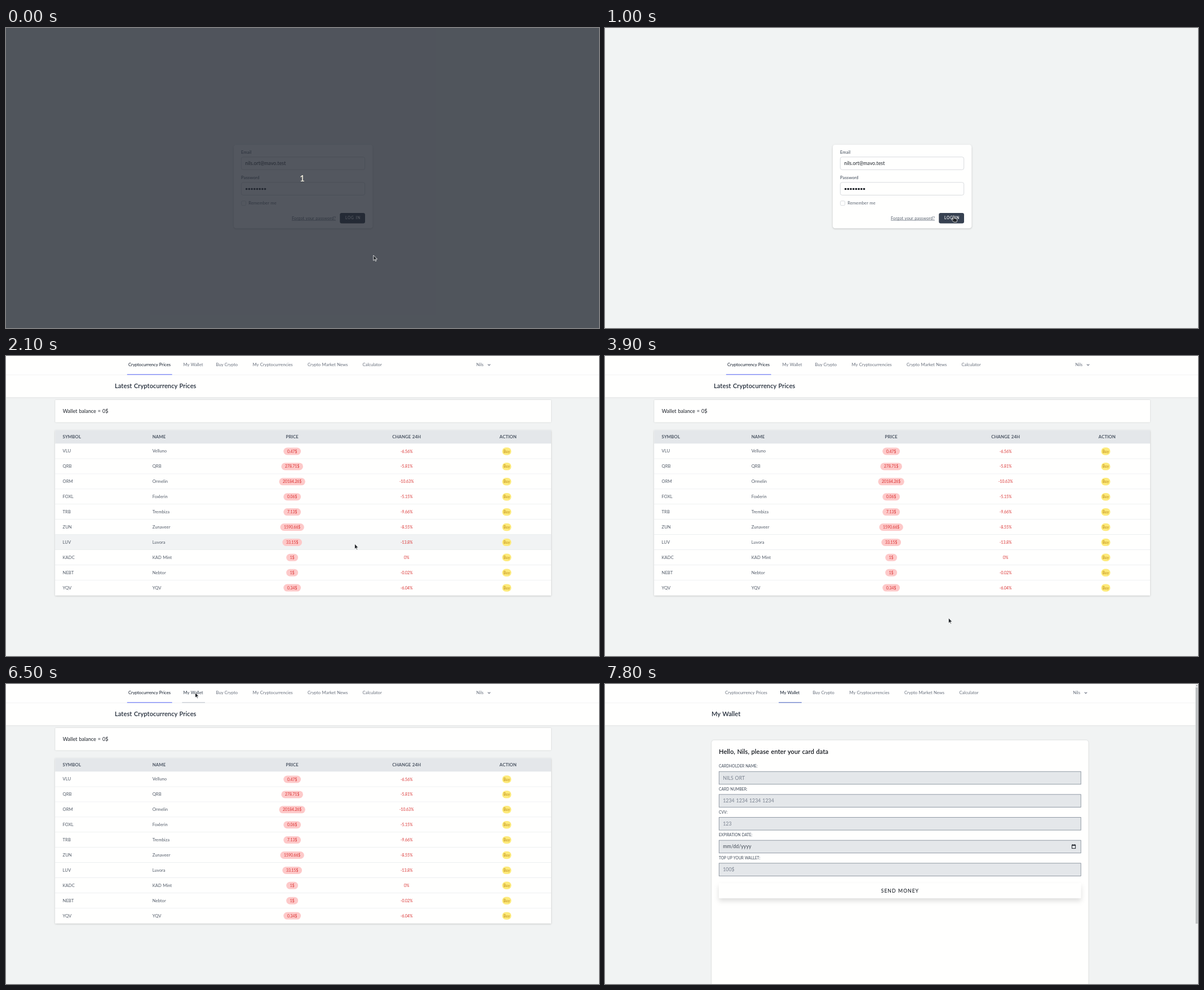
Animation, 1052 px wide and 532 px high, one loop 8100 ms. Source, as an HTML page:

```html
<!DOCTYPE html>
<html lang="en">
<head>
<meta charset="utf-8">
<title>Wallet demo</title>
<style>
  html, body { margin: 0; width: 100%; height: 100%; overflow: hidden; background: #f1f3f3; }
  svg { display: block; width: 100vw; height: 100vh; }
  text { font: 400 7.67px Lato, "Open Sans", sans-serif; letter-spacing: .006em; word-spacing: .06em; white-space: pre; }
  .mid { text-anchor: middle; }
  .label { font-weight: 500; fill: #4b5563; }
  .input { font-size: 8.77px; fill: #1b2028; }
  .hint { font-size: 8.77px; fill: #7b8390; }
  .title { font-size: 11.1px; font-weight: 600; fill: #1f2937; }
  .nav { font-weight: 500; letter-spacing: 0; fill: #737a86; }
  .head { font-size: 7.8px; font-weight: 700; fill: #4b5563; letter-spacing: .01em; }
  .cell { fill: #525b68; }
  .small { font-size: 6.8px; fill: #d92f2f; letter-spacing: 0; }
  .buy { fill: #bd8a12; }
  .caps { font-size: 6.6px; font-weight: 500; fill: #4b5563; }
  .card { fill: #fffffe; filter: drop-shadow(0 .6px .9px rgba(0,0,0,.16)); }
  .deep { fill: #fffffe; filter: drop-shadow(0 1.5px 1.6px rgba(0,0,0,.2)); }
  .send { fill: #fffffe; filter: drop-shadow(0 5px 4px rgba(0,0,0,.13)); }
</style>
</head>
<body>
<svg id="stage" viewBox="0 0 1052 532" preserveAspectRatio="none"></svg>
<script>
const LOOP = 8100, STEP = 100;
const ROW_TOP = 155.5, ROW_H = 26.9;
const BUTTON = { x: 592.3, y: 328, w: 44.7, h: 18.5 };

const LINKS = [
  ["Cryptocurrency Prices", 217, 75.5],
  ["My Wallet", 314.5, 36.3],
  ["Buy Crypto", 372.5, 38.7],
  ["My Cryptocurrencies", 437.5, 71.5],
  ["Crypto Market News", 535, 71.5],
  ["Calculator", 632.5, 35.7]
];

const COINS = [
  ["VLU", "Velluno", "0.47", "-6.56"],
  ["QRB", "QRB", "278.71", "-5.81"],
  ["ORM", "Ormelin", "20184.26", "-10.63"],
  ["FOXL", "Foxlerin", "0.06", "-5.15"],
  ["TRB", "Trembiza", "7.13", "-9.66"],
  ["ZUN", "Zunaveer", "1590.66", "-8.55"],
  ["LUV", "Luvora", "33.15", "-13.8"],
  ["KADC", "KAD Mint", "1", "0"],
  ["NEBT", "Nebtor", "1", "-0.02"],
  ["YQV", "YQV", "0.34", "-6.04"]
];

const FIELDS = [
  ["CARDHOLDER NAME:", "NILS ORT"],
  ["CARD NUMBER:", "1234 1234 1234 1234"],
  ["CVV:", "123"],
  ["EXPIRATION DATE:", "mm/dd/yyyy"],
  ["TOP UP YOUR WALLET:", "100$"]
];

// Pointer moves: start time, steps, end x, end y, easing, downward bow
const smooth = p => p * p * (3 - 2 * p);
const speedUp = p => p * p;
const slowDown = p => 1 - (1 - p) ** 2;
const MOVES = [
  [500, 6, 618.5, 333, smooth, 0],
  [3100, 3, 600, 480, smooth, 0],
  [3900, 4, 750, 232, speedUp, 0],
  [4600, 3, 474, 119, smooth, 0],
  [5100, 7, 335.5, 15, slowDown, 0],
  [7200, 7, 22, -10.5, smooth, 22]
];

const rect = (x, y, w, h, fill, r = 0, more = "") =>
  `<rect x="${x}" y="${y}" width="${w}" height="${h}" rx="${r}" fill="${fill}" ${more}/>`;
const text = (x, y, s, cls, more = "") =>
  `<text x="${x}" y="${y}" class="${cls}" ${more}>${s}</text>`;
const box = (x, y, w, h, r) =>
  rect(x, y, w, h, "#fffffe", r, 'stroke="#ced2d7" stroke-width=".8"');

function loginPage() {
  const dots = Array.from({ length: 8 }, (_, i) =>
    `<circle cx="${426.7 + i * 4.7}" cy="285.5" r="1.8" fill="#15191f"/>`).join("");
  return rect(404, 207, 246.4, 148.3, "", 4.4, 'class="deep"') +
    text(417, 222.8, "Email", "label") + box(417.4, 228.7, 219.3, 22.6, 3.3) +
    text(424.3, 243, "nils.ort@mavo.test", "input") +
    text(417, 268, "Password", "label") + box(417.4, 273.8, 219.3, 22.6, 3.3) + dots +
    box(417.6, 306.7, 8, 8, 2) +
    text(430.3, 313.2, "Remember me", "", 'fill="#5b6471"') +
    text(507, 339.6, "Forgot your password?", "", 'fill="#5b6471" text-decoration="underline"') +
    rect(BUTTON.x - .8, BUTTON.y - .8, BUTTON.w + 1.6, BUTTON.h + 1.6, "none", 4,
      'id="ring" stroke="#c9ced5" stroke-width="1.6"') +
    rect(BUTTON.x, BUTTON.y, BUTTON.w, BUTTON.h, "#1f2937", 3.3, 'id="button"') +
    text(602, 339.4, "LOG IN", "", 'fill="#fffffe" style="font-size:6.6px;font-weight:600;letter-spacing:.12em"');
}

function header(active, title, dx) {
  const links = LINKS.map(([s, x, w], i) => {
    const on = i === active;
    return `<g class="link">` + text(x, 18.1, s, "nav", on ? 'style="fill:#1f2937"' : "") +
      rect(x - 2.2, 32.1, w + 4.4, 1.4, on ? (dx ? "#7487d0" : "#818cf8") : "none") + `</g>`;
  }).join("");
  return rect(0, 0, 1052, 73.2, "", 0, 'class="card"') + rect(0, 33.2, 1052, .7, "#eceff1") +
    `<g transform="translate(${dx})">` + links + text(834.3, 17.8, "Nils", "nav") +
    `<path d="M854.8 14.6l2.2 2.1 2.2-2.1" fill="none" stroke="#6b7280" stroke-width="1.1"/>` +
    text(193, 57.3, title, "title") + `</g>`;
}

function coinRow([symbol, name, price, change], i) {
  const y = ROW_TOP + i * ROW_H, base = y + 16;
  const digits = price.replace(".", "").length + 1;
  const w = 13.2 + 3.87 * digits + (price.includes(".") ? 2.2 : 0);
  return rect(87.3, y, 879.7, ROW_H, "#fffffe", 0, 'class="row"') +
    (i < 9 ? rect(87.3, y + ROW_H - .6, 879.7, .9, "#e2e5e8") : "") +
    text(100.5, base - .1, symbol, "cell") + text(259.7, base - .1, name, "cell") +
    rect(507.7 - w / 2, y + 7, w, 13, "#fdc9c9", 6.5) +
    text(507.7, base, price + "$", "small mid") +
    text(710.7, base, change + "%", "small mid") +
    rect(880.2, y + 6.8, 16.2, 13.4, "#fdea7b", 6.7) +
    text(888.3, base, "Buy", "small buy mid");
}

function pricesPage() {
  return header(0, "Latest Cryptocurrency Prices", 0) +
    rect(87.3, 78, 879.7, 39.4, "", 1, 'class="card"') +
    text(100.7, 100.8, "Wallet balance = 0$", "input", 'style="font-size:9px"') +
    rect(87.3, 131.3, 879.7, 293.2, "", 0, 'class="deep"') +
    rect(87.3, 131.3, 879.7, 24.2, "#e4e7ea") +
    text(100.5, 146.2, "SYMBOL", "head") + text(259.7, 146.2, "NAME", "head") +
    text(507.7, 146.2, "PRICE", "head mid") + text(710.7, 146.2, "CHANGE 24H", "head mid") +
    text(890.7, 146.2, "ACTION", "head mid") + COINS.map(coinRow).join("");
}

function walletPage() {
  const fields = FIELDS.map(([label, hint], i) => {
    const y = i * 40.65;
    return text(202, 148.4 + y, label, "caps") +
      rect(202.3, 155.2 + y, 641.9, 22.6, "#e4e7ea", 0, 'stroke="#7b8592" stroke-width=".8"') +
      text(209.2, 169.5 + y, hint, "hint", i === 3 ? 'style="fill:#414954"' : "");
  }).join("");
  return header(1, "My Wallet", -4.1) +
    rect(189.2, 99.7, 668.3, 450, "", 4.4, 'class="card"') +
    text(202, 124, "Hello, Nils, please enter your card data", "title", 'style="fill:#11151b"') +
    fields +
    `<g fill="none" stroke="#20252c"><rect x="828.4" y="285.4" width="6.2" height="6.2"/>` +
    `<path d="M828.4 286h6.2" stroke-width="1.6"/><path d="M829.8 284v1.4M833.2 284v1.4"/></g>` +
    rect(202, 353.3, 642.5, 26.7, "", 1, 'class="send"') +
    text(523.4, 369.7, "SEND MONEY", "input mid", 'style="font-weight:500;letter-spacing:.1em"') +
    rect(1047.3, 0, 4.7, 532, "#f0f1f1") + rect(1047.8, 6, 3.8, 419, "#bcbfc0") +
    `<path d="M1048.4 3.6l1.5-1.8 1.5 1.8z" fill="#6d7072"/>`;
}

const stage = document.getElementById("stage");
stage.innerHTML = rect(0, 0, 1052, 532, "#f1f3f3") +
  `<g id="login">${loginPage()}</g><g id="prices">${pricesPage()}</g><g id="wallet">${walletPage()}</g>` +
  `<g id="count">${rect(0, 0, 1052, 532, "rgba(37,42,52,.79)")}` +
  text(525.5, 272, "1", "mid", 'fill="#fdf8e6" style="font-size:15.5px;font-weight:500"') + `</g>` +
  `<g id="pointer" stroke="#fffffe" stroke-width=".8" stroke-linejoin="round" fill="#22262b">` +
  `<path id="arrow" d="M0 0V9.4L2.2 7.4 3.7 10.6 5.1 10 3.7 6.9H6.7Z"/>` +
  `<path id="hand" d="M-1 1Q-1 0 0 0T1 1V4.4L5 5.2Q6.2 5.5 6.2 6.8V8.8L5.2 11.2H.2L-3.2 7.4Q-3.8 6.4 -3 6T-1.4 6.3L-1 6.7Z"/></g>`;

const $ = id => document.getElementById(id);
const pages = ["login", "prices", "wallet"].map($);
const rows = [...document.querySelectorAll(".row")];
const navs = pages.map(p => [...p.querySelectorAll(".link")]);
const show = (node, on) => node.setAttribute("display", on ? "inline" : "none");

function pointerAt(t) {
  let x = 651.8, y = 403;
  for (const [start, steps, endX, endY, ease, bow] of MOVES) {
    if (t < start) break;
    const p = ease(Math.min(1, ((t - start) / STEP + 1) / steps));
    x += (endX - x) * p;
    y += (endY - y) * p + bow * Math.sin(Math.PI * p);
  }
  return [x, y];
}

function buttonColor(t, over) {
  if (t >= 1300 && t < 1400) return "#111827";
  if (t >= 1400 && t < 1500) return "#242d3c";
  return over ? "#374151" : "#1f2937";
}

function draw(ms) {
  const t = Math.floor((ms % LOOP) / STEP) * STEP;
  const page = t < 2100 ? 0 : t < 6600 ? 1 : 2;
  const [x, y] = pointerAt(t);
  pages.forEach((p, i) => show(p, i === page));
  show($("count"), t < 100);

  let hand = false;
  if (page === 0) {
    hand = x > BUTTON.x && x < BUTTON.x + BUTTON.w && y > BUTTON.y && y < BUTTON.y + BUTTON.h;
    $("button").setAttribute("fill", buttonColor(t, hand));
    $("ring").setAttribute("opacity", Math.max(0, Math.min(1, (t - 1200) / 300)));
  } else {
    const dx = page === 2 ? -4.1 : 0;
    navs[page].forEach((link, i) => {
      const [, left, w] = LINKS[i];
      const over = y > 0 && y < 33.5 && x > left + dx - 2 && x < left + dx + w + 2;
      hand = hand || over;
      if (i === page - 1) return;
      link.firstChild.style.fill = over ? "#414b59" : "";
      link.lastChild.setAttribute("fill", over ? "#cbd0d6" : "none");
    });
  }
  if (page === 1) {
    const hot = Math.floor((y - ROW_TOP) / ROW_H);
    rows.forEach((r, i) => r.setAttribute("fill", i === hot ? "#f1f3f4" : "#fffffe"));
  }
  if (t === 6500) hand = false;
  show($("hand"), hand);
  show($("arrow"), !hand);
  $("pointer").setAttribute("transform", `translate(${x.toFixed(2)} ${y.toFixed(2)})`);
}

const begin = performance.now();
function tick() {
  draw(performance.now() - begin);
  requestAnimationFrame(tick);
}
tick();
</script>
</body>
</html>
```
